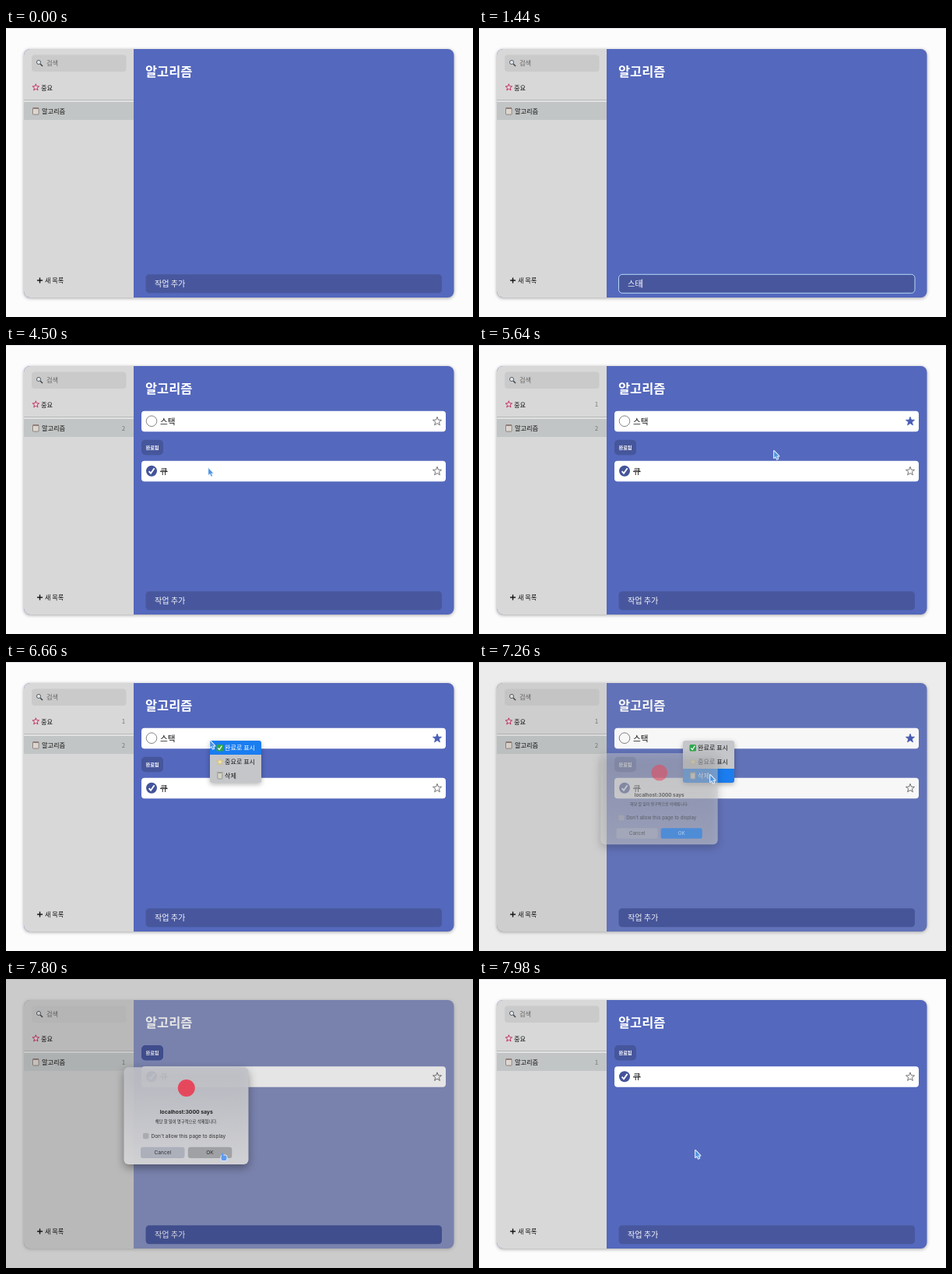
Recreate the animation shown at these times as an HTML page with a canvas. Size 600 px wide and 371 px high, loop 8 s.

```html
<!DOCTYPE html>
<html lang="ko">
<head>
<meta charset="utf-8">
<title>할 일 목록</title>
<style>
html, body { margin: 0; width: 100%; height: 100%; overflow: hidden; background: #fcfcfd; }
canvas { display: block; width: 600px; height: 371px; }
</style>
</head>
<body>
<canvas id="stage"></canvas>
<script>
const LOOP = 8000, STEP = 60;
const canvas = document.getElementById('stage');
const ctx = canvas.getContext('2d');
const ratio = window.devicePixelRatio || 1;
canvas.width = Math.round(600 * ratio);
canvas.height = Math.round(371 * ratio);

const KR = '"Noto Sans CJK KR", "Noto Sans CJK", "Noto Sans KR", sans-serif';
const LATIN = 'Inter, sans-serif';

// When things happen, in ms
const AT = {
  focus: 660, addFirst: 1740, addSecond: 2580, blur: 3000, check: 4200,
  star: 5040, menu: 6600, menuEnd: 7320, dialog: 7200, remove: 7740, close: 7800
};
const TYPED = [
  [960, 'ㅅ'], [1080, '스'], [1260, '슽'], [1380, '스태'], [1560, '스택'], [1740, ''],
  [1980, 'ㅋ'], [2220, '큐'], [2580, '']
];
// Pointer path: time, x, y
const PATH = [
  [60, 420, 214], [240, 372, 250], [600, 268, 328], [3240, 268, 328],
  [3660, 232, 226], [4080, 186, 128], [4200, 186, 128], [4500, 260, 158],
  [4740, 420, 128], [4980, 553, 97], [5100, 553, 97], [5640, 379, 136],
  [5880, 322, 126], [6420, 262, 101], [6660, 262, 101], [7020, 297, 145],
  [7320, 297, 145], [7620, 278, 224], [7800, 278, 224], [7920, 278, 220], [8000, 278, 220]
];

const clamp = v => Math.max(0, Math.min(1, v));

function slope(i, axis) {
  const a = PATH[i - 1], b = PATH[i], c = PATH[i + 1];
  const held = p => p[1] === b[1] && p[2] === b[2];
  if (!a || !c || held(a) || held(c)) return 0;
  return (c[axis] - a[axis]) / (c[0] - a[0]);
}

function pointerAt(t) {
  if (t < PATH[0][0]) return null;
  if (t > 780 && t < 3300) return null;
  const i = Math.max(0, PATH.findIndex(p => p[0] > t) - 1);
  const a = PATH[i], b = PATH[i + 1], span = b[0] - a[0], u = (t - a[0]) / span;
  return [1, 2].map(k => {
    const u2 = u * u, u3 = u2 * u;
    return (2 * u3 - 3 * u2 + 1) * a[k] + (3 * u2 - 2 * u3) * b[k]
      + span * ((u3 - 2 * u2 + u) * slope(i, k) + (u3 - u2) * slope(i + 1, k));
  });
}

function box(x, y, w, h, r, fill, stroke) {
  ctx.beginPath();
  ctx.roundRect(x, y, w, h, r);
  if (fill) { ctx.fillStyle = fill; ctx.fill(); }
  if (stroke) { ctx.strokeStyle = stroke; ctx.lineWidth = 1; ctx.stroke(); }
}

function line(points, color, width) {
  ctx.beginPath();
  points.forEach(([x, y], i) => i ? ctx.lineTo(x, y) : ctx.moveTo(x, y));
  ctx.strokeStyle = color;
  ctx.lineWidth = width;
  ctx.stroke();
}

function disc(x, y, r, fill, stroke, width = 1) {
  ctx.beginPath();
  ctx.arc(x, y, r, 0, Math.PI * 2);
  if (fill) { ctx.fillStyle = fill; ctx.fill(); }
  if (stroke) { ctx.strokeStyle = stroke; ctx.lineWidth = width; ctx.stroke(); }
}

// Text placed by its vertical middle
function text(s, x, y, size, color, weight = 400, align = 'left', family = KR) {
  ctx.font = `${weight} ${size}px ${family}`;
  ctx.textAlign = align;
  ctx.fillStyle = color;
  ctx.fillText(s, x, y + size * 0.37);
  return ctx.measureText(s).width;
}

function star(x, y, r, fill, stroke, width = 0.9) {
  ctx.beginPath();
  for (let i = 0; i < 10; i++) {
    const a = -Math.PI / 2 + i * Math.PI / 5, q = i % 2 ? r * 0.42 : r;
    ctx.lineTo(x + q * Math.cos(a), y + q * Math.sin(a));
  }
  ctx.closePath();
  if (fill) { ctx.fillStyle = fill; ctx.fill(); }
  if (stroke) { ctx.strokeStyle = stroke; ctx.lineWidth = width; ctx.stroke(); }
}

function withShadow(color, blur, dy, draw) {
  ctx.save();
  ctx.shadowColor = color;
  ctx.shadowBlur = blur * ratio;
  ctx.shadowOffsetY = dy * ratio;
  draw();
  ctx.restore();
}

function drawPanels() {
  ctx.fillStyle = '#fcfcfd';
  ctx.fillRect(0, 0, 600, 371);
  ctx.fillStyle = '#e6e7eb';
  ctx.fillRect(0, 0, 600, 1);
  withShadow('rgba(0,0,0,.35)', 4, 1, () => box(23, 27, 552.5, 319, 8, '#5468bd'));
  box(23, 27, 141, 319, [8, 0, 0, 8], '#d8d8d8');
}

function drawSidebar(count, important) {
  box(33, 34.5, 121.5, 21.5, 4, '#cacaca');
  line([[44, 46], [47, 49]], '#444', 1.5);
  disc(42, 44, 2.6, '#dce6ee', '#555', 0.9);
  text('검색', 52, 45, 8.2, '#666');

  star(38.3, 76.3, 4.5, '#e6dadd', '#bd2458', 0.9);
  text('중요', 45, 76.5, 8.2, '#111', 500);
  if (important) text('1', 151, 76.5, 8, '#777', 400, 'center');

  ctx.fillStyle = '#b4b5b5';
  ctx.fillRect(23, 92, 141, 1);
  ctx.fillStyle = '#e6e6e6';
  ctx.fillRect(23, 93, 141, 1.5);
  ctx.fillStyle = '#c2c5c5';
  ctx.fillRect(23, 95, 141, 23);

  box(34.5, 103, 7.5, 8, 0.5, '#e9e4dc', '#8c7f7a');
  for (let y = 105; y < 111; y += 2) line([[36, y], [40.5, y]], '#aaa49e', 0.5);
  line([[34.5, 103], [42, 103]], '#7c6460', 1.2);
  text('알고리즘', 46, 107, 8.2, '#111', 500);
  if (count) text(count, 151, 107, 8, '#777', 400, 'center');

  line([[40, 324], [47, 324]], '#111', 1.4);
  line([[43.5, 320.5], [43.5, 327.5]], '#111', 1.4);
  text('새 목록', 50, 324.5, 8.1, '#111', 500);
}

function drawItem(label, y, done, starred) {
  box(174, y, 391, 26.5, 4, '#fff');
  const mid = y + 13;
  if (done) {
    disc(187, mid, 7, '#44549a');
    line([[183.6, mid + 0.4], [186, mid + 3], [190.6, mid - 3.4]], '#fff', 1.9);
  } else {
    disc(187, mid, 6.8, '#fff', '#777', 0.9);
  }
  const width = text(label, 198, mid, 10.6, '#111');
  if (done) line([[198, mid + 0.5], [198 + width, mid + 0.5]], '#111', 0.9);
  star(554, mid + 0.4, 5.8, starred ? '#485cb6' : '#fff', starred ? '#485cb6' : '#666', 0.9);
}

function drawTag(y) {
  box(174, y, 28, 19.5, 5, '#46569c');
  text('완료됨', 188, y + 9.8, 6.2, '#fff', 700, 'center');
}

function drawInput(t) {
  const focused = t >= AT.focus && t < AT.blur;
  box(179.5, 316.3, 380.5, 24, 4.5, '#48579d', focused ? '#b4d9fb' : null);
  const entry = TYPED.filter(e => e[0] <= t).pop();
  const value = entry ? entry[1] : '';
  const width = text(value || '작업 추가', 191, 328, 10.1, '#f4f5fb');
  if (focused) line([[191 + (value ? width : 0), 322.5], [191 + (value ? width : 0), 333.5]], '#fff', 0.7);
}

function drawList(t) {
  text('알고리즘', 179, 56, 16.4, '#fff', 700);
  const removed = t >= AT.remove, done = t >= AT.check;
  if (t >= AT.addFirst && !removed) drawItem('스택', 84.7, false, t >= AT.star);
  if (done) drawTag(removed ? 85 : 121.7);
  if (t >= AT.addSecond) drawItem('큐', removed ? 112.3 : done ? 148.7 : 115.9, done, false);
}

function drawMenu(pointer) {
  withShadow('rgba(0,0,0,.3)', 6, 2, () => box(262, 101, 66, 54, 3, '#c4c6c9'));
  const row = Math.max(0, Math.min(2, Math.floor((pointer[1] - 101) / 18)));
  const ends = [[3, 3, 0, 0], 0, [0, 0, 3, 3]];
  box(262, 101 + row * 18, 66, 18, ends[row], '#1a7df0');
  ['완료로 표시', '중요로 표시', '삭제'].forEach((label, i) => {
    text(label, 281, 110.3 + i * 17.7, 8.1, i === row ? '#fff' : '#1a1a1a');
  });
  box(270.5, 106, 8.5, 8.5, 1.5, '#2fa64a');
  line([[272.3, 110.5], [274.2, 112.5], [277.3, 107.7]], '#fff', 1.2);
  star(274.8, 128.4, 4.5, '#f0e3ae', '#d5b655', 0.6);
  box(271.8, 142.5, 6, 7.5, 1, '#d5d4c4', '#96988f');
  line([[270.8, 141.8], [278.8, 141.8]], '#96988f', 1);
}

function drawDialog(p, pressed) {
  ctx.save();
  ctx.translate(231.5, 175.7);
  ctx.scale(0.91 + 0.09 * p, 0.91 + 0.09 * p);
  ctx.translate(-231.5, -175.7);
  ctx.globalAlpha = Math.sqrt(p);
  const shade = ctx.createLinearGradient(0, 113, 0, 238);
  shade.addColorStop(0, 'rgba(192,193,199,.9)');
  shade.addColorStop(1, 'rgba(214,214,216,.96)');
  withShadow('rgba(0,0,0,.4)', 12, 4, () => box(151.5, 113.3, 160, 124.7, 6, shade));
  disc(231.8, 140, 11, '#e5485d');
  text('localhost:3000 says', 231.7, 170.7, 6.8, '#222', 700, 'center', LATIN);
  text('해당 할 일이 영구적으로 삭제됩니다.', 231.7, 183, 5.35, '#222', 500, 'center');
  box(176, 197.7, 7.5, 7.5, 1.8, '#a9abb0');
  text("Don't allow this page to display", 186.5, 201.5, 6.5, '#333', 400, 'left', LATIN);
  box(173, 215.7, 56.5, 14.3, 3, '#acb0bb');
  text('Cancel', 201.3, 222.8, 6.6, '#333', 400, 'center', LATIN);
  box(233.8, 215.7, 56.5, 14.3, 3, pressed ? '#a0a1a4' : '#1b80ee');
  text('OK', 262, 222.8, 6.6, pressed ? '#333' : '#fff', 400, 'center', LATIN);
  ctx.restore();
}

function drawPointer([x, y], kind) {
  ctx.save();
  ctx.translate(x, y);
  ctx.lineJoin = ctx.lineCap = 'round';
  if (kind === 'beam') {
    line([[0, -5], [0, 5]], '#e4edff', 1);
    line([[-1.5, -5], [1.5, -5]], '#e4edff', 0.8);
    line([[-1.5, 5], [1.5, 5]], '#e4edff', 0.8);
  } else if (kind === 'hand') {
    box(-2, 2, 8, 7.5, 2.5, '#5d9bf0', '#e8f0fc');
    box(-1, -0.5, 2.4, 6, 1.2, '#5d9bf0');
  } else {
    const tip = new Path2D('M0 0V9L2.1 7.2L3.7 10.7L5.2 10L3.7 6.7H6.4Z');
    ctx.strokeStyle = 'rgba(255,255,255,.85)';
    ctx.lineWidth = 2;
    ctx.stroke(tip);
    ctx.fillStyle = '#4f93dc';
    ctx.fill(tip);
    ctx.strokeStyle = '#b9dafa';
    ctx.lineWidth = 0.5;
    ctx.stroke(tip);
  }
  ctx.restore();
}

function pointerKind(t, [, y]) {
  if (t >= 7560 && t < 7860) return 'hand';
  return y > 316 ? 'beam' : 'arrow';
}

function draw(now) {
  const t = Math.floor((now % LOOP) / STEP) * STEP;
  const pointer = pointerAt(t);
  const dim = clamp((t - AT.dialog) / 180) * clamp(1 - (t - AT.close) / 150);
  const removed = t >= AT.remove;
  ctx.setTransform(ratio, 0, 0, ratio, 0, 0);
  drawPanels();
  ctx.fillStyle = `rgba(195,195,195,${0.46 * dim})`;
  ctx.fillRect(0, 0, 600, 371);
  drawSidebar((t >= AT.addFirst) + (t >= AT.addSecond) - removed, t >= AT.star && !removed);
  drawList(t);
  drawInput(t);
  ctx.fillStyle = `rgba(0,0,0,${0.1 * dim})`;
  ctx.fillRect(0, 0, 600, 371);
  if (t >= AT.menu && t < AT.menuEnd) drawMenu(pointer);
  if (dim > 0) drawDialog(dim, removed);
  if (pointer) drawPointer(pointer, pointerKind(t, pointer));
}

const start = performance.now();
function tick() {
  draw(performance.now() - start);
  requestAnimationFrame(tick);
}
tick();
</script>
</body>
</html>
```
